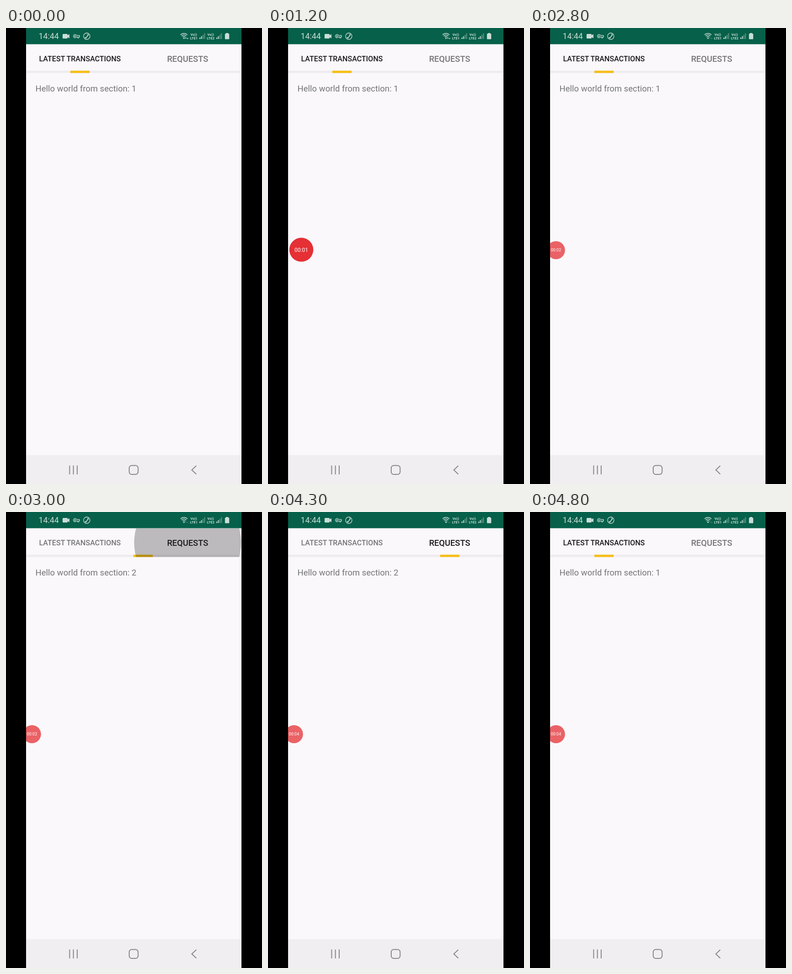
Recreate the animation shown at these times as an HTML page. Size 561x998 px, loop 5 s.

```html
<!DOCTYPE html>
<html lang="en">
<head>
<meta charset="utf-8">
<title>Tab switch</title>
<style>
  html, body { margin: 0; width: 100%; height: 100%; overflow: hidden; background: #000; }
  svg { display: block; width: 561px; height: 998px; font-family: Roboto, sans-serif; }
  .mid { text-anchor: middle; }
  .tab { font-weight: 500; text-anchor: middle; }
  .line { fill: none; stroke-width: 2; }
</style>
</head>
<body>
<svg viewBox="0 0 561 998">
  <defs>
    <clipPath id="screen"><rect x="44" width="472" height="998"/></clipPath>
    <clipPath id="leftTab"><rect x="44" y="36" width="236" height="62.5"/></clipPath>
    <clipPath id="rightTab"><rect x="280" y="36" width="236" height="62.5"/></clipPath>
    <g id="bars">
      <path d="M0 24v-3h2v3zM3.4 24v-6h2v6z" fill="#c9ddd6"/>
      <path d="M6.8 24v-9h2v9zM10.2 24v-12.500h2v12.500z" fill="#5f9686"/>
    </g>
  </defs>
  <rect width="561" height="998"/>
  <rect x="44" width="472" height="998" fill="#faf8fb"/>
  <rect x="44" width="472" height="35.500" fill="#06604a"/>

  <g fill="#c9ddd6">
    <text x="71.500" y="24.400" font-size="17.800">14:44</text>
    <path d="M125.500 13h8q1.500 0 1.500 1.500v1.500l4-2.500v9l-4-2.500v1.500q0 1.500-1.500 1.500h-8q-1.500 0-1.500-1.500v-7q0-1.500 1.500-1.500z"/>
    <g fill="none" stroke="#c9ddd6" stroke-width="1.300">
      <path d="M154.600 16.300h6.400v3h-1.400v2.200h-2.800v-2.200h-2.200a3.600 3.600 0 1 1 0-3z"/>
      <circle cx="151.300" cy="17.800" r="1"/>
      <circle cx="177" cy="18" r="7"/>
      <path d="M179.800 14.200q-1 4.800-5.600 7.400" stroke-width="1.700"/>
      <path d="M178.600 13.700l2 1.200-.9 1.900M173.600 20.200l.6 2 2.200-.7" stroke-width="1.500"/>
      <path d="M382.500 15a10.500 10.500 0 0 1 15 0M384.800 17.500a7.200 7.200 0 0 1 10.400 0M387.100 20a4 4 0 0 1 5.800 0" stroke-width="1.500"/>
    </g>
    <circle cx="390" cy="22.500" r="1.500"/>
    <path id="traffic" d="M392.500 21h3.400l-1.700 3zM396.300 24h3.400l-1.700-3z"/>
    <g class="mid" font-weight="700" font-size="7.500">
      <text x="411.500" y="17">Vo))</text><text x="411.500" y="24.500">LTE1</text>
      <text x="448.500" y="17">Vo))</text><text x="448.500" y="24.500">LTE2</text>
    </g>
    <use href="#bars" x="424"/>
    <use href="#bars" x="461"/>
    <path d="M482 11h5v1.500h1.200q1 0 1 1v10q0 1-1 1h-7.400q-1 0-1-1v-10q0-1 1-1h1.200z"/>
  </g>

  <rect x="44" y="93.500" width="472" height="5" fill="#eeecef"/>
  <rect id="indicator" y="93.500" width="42.300" height="5" fill="#f6bd14"/>
  <g clip-path="url(#rightTab)"><circle id="rightRipple" cx="398" cy="67"/></g>
  <g clip-path="url(#leftTab)"><circle id="leftRipple" cx="162" cy="67"/></g>
  <text id="latest" class="tab" x="162" y="73.200" font-size="16.100">LATEST TRANSACTIONS</text>
  <text id="requests" class="tab" x="398" y="74.400" font-size="18.400">REQUESTS</text>
  <text id="body" x="64.600" y="139.300" font-size="18.500" fill="#757477"></text>

  <g clip-path="url(#screen)">
    <g id="recorder">
      <circle r="26.300" fill="#e53035"/>
      <text id="timer" class="mid" y="4.300" font-size="12" fill="#fff"></text>
    </g>
  </g>

  <rect x="44" y="935" width="472" height="63" fill="#f0eef1"/>
  <g class="line" stroke="#89878a">
    <path d="M139.500 957.500v19.500M147.700 957.500v19.500M156 957.500v19.500"/>
    <rect x="270" y="957.500" width="19.500" height="19.500" rx="5.500"/>
    <path d="M417 958l-9.800 9.200 9.800 9.200"/>
  </g>
</svg>
<script>
const LOOP = 5000, STEP = 100;
const TAP_RIGHT = 2884, TAP_LEFT = 4400;
const TAB_X = [141, 377.2];
const $ = id => document.getElementById(id);
const set = (id, attrs) => { for (const k in attrs) $(id).setAttribute(k, attrs[k]); };
const ramp = (t, start, length) => Math.min(1, Math.max(0, (t - start) / length));
const mix = (a, b, p) => a + (b - a) * p;

// cubic-bezier(0.4, 0, 0.2, 1)
function fastOutSlowIn(x) {
  let lo = 0, hi = 1, s;
  for (let i = 0; i < 24; i++) {
    s = (lo + hi) / 2;
    const q = 1 - s;
    if (1.2 * q * q * s + 0.6 * q * s * s + s * s * s < x) lo = s; else hi = s;
  }
  return s * s * (3 - 2 * s);
}

function ripple(id, t, tap) {
  const grow = ramp(t, tap - 60, 225);
  set(id, {
    r: 123 * (1 - (1 - grow) ** 2),
    opacity: 0.25 * ramp(t, tap - 60, 75) * (1 - ramp(t, tap + 205, 150))
  });
}

function draw(t) {
  const onRight = t >= TAP_RIGHT && t < TAP_LEFT;
  const slide = fastOutSlowIn(ramp(t, TAP_RIGHT, 300)) - fastOutSlowIn(ramp(t, TAP_LEFT, 300));
  set('indicator', { x: mix(...TAB_X, slide) });
  ripple('rightRipple', t, TAP_RIGHT);
  ripple('leftRipple', t, TAP_LEFT);
  set('latest', { fill: onRight ? '#767578' : '#1b1a1c' });
  set('requests', { fill: onRight ? '#1b1a1c' : '#767578' });
  $('body').textContent = `Hello world from section: ${onRight ? 2 : 1}`;
  set('traffic', { opacity: t < 2300 ? 1 : 0.3 });

  const enter = ramp(t, 200, 400), dock = ramp(t, 2300, 500);
  const scale = mix(0.6, 1, enter) * mix(1, 0.75, dock);
  set('recorder', {
    transform: `translate(${mix(73, 57, dock)} ${mix(485.3, 486.2, dock)}) scale(${scale})`,
    opacity: enter * mix(1, 0.75, dock)
  });
  const seconds = [1200, 2300, 3300, 4300].filter(at => t >= at).length;
  $('timer').textContent = `00:0${seconds}`;
}

function tick() {
  draw(Math.floor(performance.now() % LOOP / STEP) * STEP);
  requestAnimationFrame(tick);
}
tick();
</script>
</body>
</html>
```
